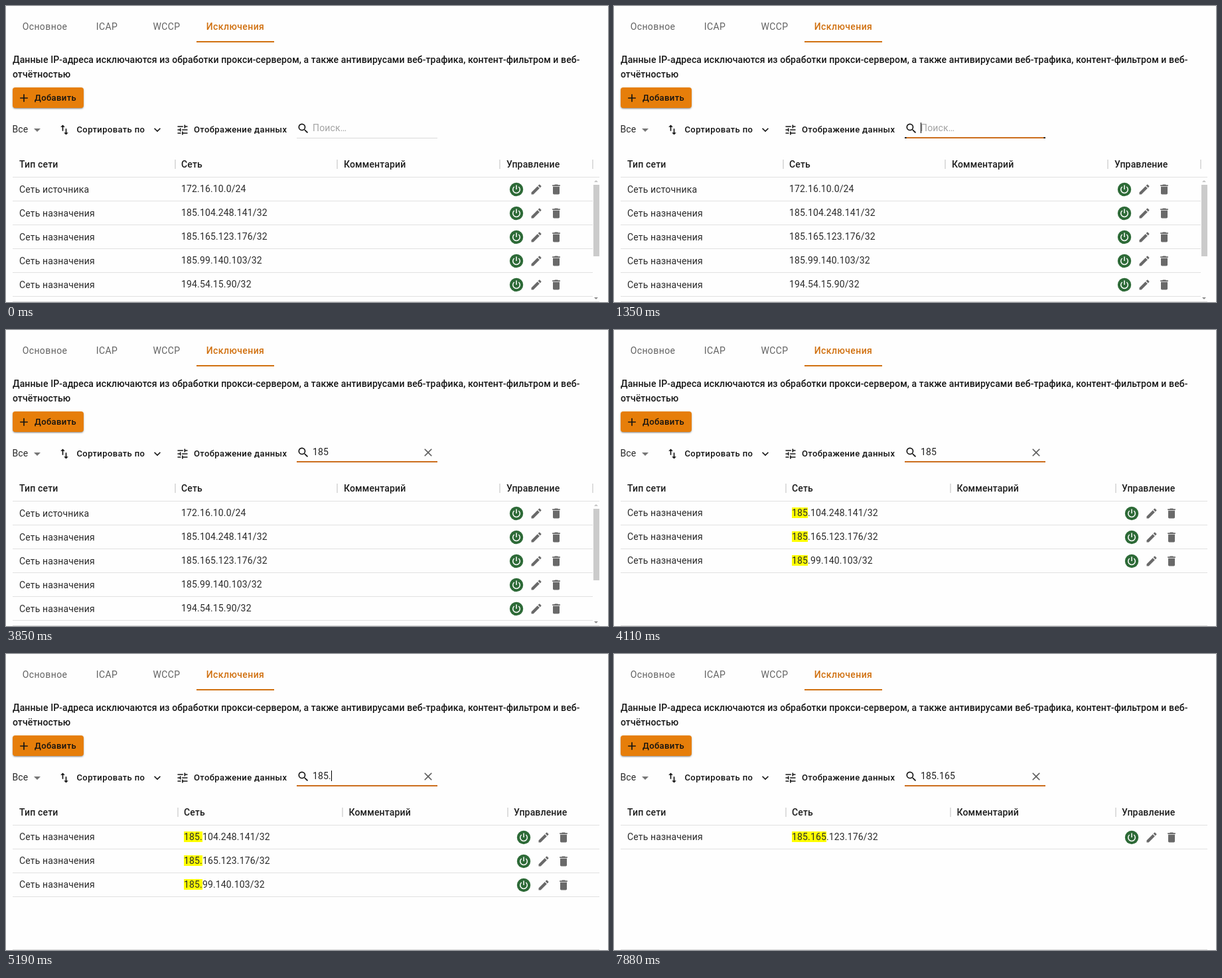
An HTML page for the animation above (8 s loop, 907 by 447 pixels).

```html
<!DOCTYPE html>
<html lang="ru">
<head>
<meta charset="utf-8">
<title>Исключения</title>
<style>
  html, body { margin: 0; width: 100%; height: 100%; overflow: hidden; background: #fefefe; }
  #stage {
    position: relative; width: 907px; height: 447px; overflow: hidden;
    font: 400 14px/20px Roboto, "Open Sans", sans-serif; letter-spacing: .15px; color: #2b2b2b;
  }
  #stage div, #stage svg { position: absolute; white-space: pre; }
  .tab { top: 21px; transform: translateX(-50%); letter-spacing: .4px; color: #636363; }
  .tab.on { color: #d0700f; font-weight: 500; }
  .intro { left: 10px; top: 70px; font-weight: 500; line-height: 22px; letter-spacing: .1px; color: #161616; }
  .btn { font-size: 13px; font-weight: 500; letter-spacing: .37px; color: #111; }
  .add {
    left: 10px; top: 123px; width: 107px; height: 31px; border-radius: 4px; background: #e67e0a;
    box-shadow: 0 2px 2px -1px #0004, 0 1px 3px #0004;
  }
  .head { top: 229px; font-weight: 500; color: #1c1c1c; }
  .sep { top: 232px; width: 2px; height: 14px; background: #dedede; }
  .rule { left: 10px; height: 1px; background: #e1e1e1; }
  .line { left: 438px; width: 212px; }
  mark { background: #ff0; color: inherit; }
  #input { left: 462px; top: 174px; color: #222; }
  #caret { display: inline-block; width: 1px; height: 16px; margin-right: -1px; background: #000; vertical-align: -3px; }
  #hint { left: 462px; top: 174px; color: #a3a3a3; }
</style>
</head>
<body>
<div id="stage">
  <div class="tab" style="left:58.5px">Основное</div>
  <div class="tab" style="left:152px">ICAP</div>
  <div class="tab" style="left:242px">WCCP</div>
  <div class="tab on" style="left:345.5px">Исключения</div>
  <div style="left:287px;top:53px;width:117px;height:2px;background:#d0700f"></div>

  <div class="intro">Данные IP-адреса исключаются из обработки прокси-сервером, а также антивирусами веб-трафика, контент-фильтром и веб-
отчётностью</div>

  <div class="add"></div>
  <div class="btn" style="left:43px;top:129px">Добавить</div>

  <div style="left:9.5px;top:176px">Все</div>
  <div class="btn" style="left:106.5px;top:177px">Сортировать по</div>
  <div class="btn" style="left:283px;top:177px">Отображение данных</div>

  <div id="hint">Поиск…</div>
  <div id="input"><span id="typed"></span><span id="caret"></span></div>
  <div class="line" style="top:199px;height:1px;background:#dadada"></div>
  <div class="line" id="hover" style="top:198px;height:2px;background:#222"></div>
  <div class="line" id="focus" style="top:198px;height:2px;background:#cb6d1c"></div>

  <div id="toolbar"></div>
  <div id="table"></div>
  <div class="rule" style="top:446px;width:884px;background:#d9d9d9"></div>
</div>

<script>
const LOOP = 8000;
const $ = id => document.getElementById(id);

const ICONS = {
  add: "M19 13h-6v6h-2v-6H5v-2h6V5h2v6h6z",
  drop: "M7 10l5 5 5-5z",
  swap: "M16 17.01V10h-2v7.01h-3L15 21l4-3.99zM9 3 5 6.99h3V14h2V6.99h3z",
  more: "M16.59 8.59 12 13.17 7.41 8.59 6 10l6 6 6-6z",
  tune: "M3 17v2h6v-2zM3 5v2h10V5zm10 16v-2h8v-2h-8v-2h-2v6zM7 9v2H3v2h4v2h2V9zm14 4v-2H11v2zm-6-4h2V7h4V5h-4V3h-2z",
  search: "M15.5 14h-.79l-.28-.27A6.5 6.5 0 1 0 13.73 14.43l.27.28v.79l5 4.99L20.49 19zm-6 0a4.5 4.5 0 1 1 0-9 4.5 4.5 0 0 1 0 9z",
  close: "M19 6.41 17.59 5 12 10.59 6.41 5 5 6.41 10.59 12 5 17.59 6.41 19 12 13.41 17.59 19 19 17.59 13.41 12z",
  edit: "M3 17.25V21h3.75L17.81 9.94l-3.75-3.75zM20.71 7.04a1 1 0 0 0 0-1.41l-2.34-2.34a1 1 0 0 0-1.41 0l-1.83 1.83 3.75 3.75z",
  trash: "M6 19c0 1.1.9 2 2 2h8c1.1 0 2-.9 2-2V7H6zM19 4h-3.5l-1-1h-5l-1 1H5v2h14z"
};

// Icons are placed by their centre.
const svg = (x, y, size, body, id = "") =>
  `<svg id="${id}" width="${size}" height="${size}" viewBox="0 0 24 24" style="left:${x - size / 2}px;top:${y - size / 2}px">${body}</svg>`;
const icon = (name, x, y, color = "#151515", size = 20) =>
  svg(x, y, size, `<path fill="${color}" d="${ICONS[name]}"/>`, "i-" + name);
const power = (x, y) => svg(x, y, 24,
  `<circle cx="12" cy="12" r="10.2" fill="#2d6a37"/>
   <path d="M8.7 8A5.3 5.3 0 1 0 15.3 8M12 5.6V12" fill="none" stroke="#fff" stroke-width="1.5"/>`);
const box = (x, y, css, text = "", cls = "") =>
  `<div class="${cls}" style="left:${x}px;top:${y}px;${css}">${text}</div>`;
const rule = (y, right) => `<div class="rule" style="top:${y}px;width:${right - 10}px"></div>`;

$("toolbar").innerHTML =
  icon("add", 27, 139) + icon("drop", 46.5, 187, "#757575", 24) + icon("swap", 88, 187) +
  icon("more", 227.5, 187) + icon("tune", 265.5, 187) + icon("search", 448, 185) +
  icon("close", 635.5, 185, "#5f5f5f");

const NETS = ["172.16.10.0/24", "185.104.248.141/32", "185.165.123.176/32", "185.99.140.103/32", "194.54.15.90/32"];

function tableHtml(query) {
  const full = !query;
  const cols = full ? [20, 264, 509, 754] : [20, 268, 516.5, 765];
  const seps = full ? [253.5, 498, 743, 882.5] : [257.5, 505.5, 754.5];
  const right = full ? 884 : 894;
  const titles = ["Тип сети", "Сеть", "Комментарий", "Управление"];
  let html = titles.map((s, i) => `<div class="head" style="left:${cols[i]}px">${s}</div>`).join("")
    + seps.map(x => `<div class="sep" style="left:${x}px"></div>`).join("")
    + rule(258, 894);
  NETS.filter(n => n.startsWith(query)).forEach((net, i) => {
    const y = 266 + 36 * i, x = cols[3] + 15, mid = y + 10.5;
    const kind = full && i === 0 ? "Сеть источника" : "Сеть назначения";
    const addr = full ? net : `<mark>${query}</mark>${net.slice(query.length)}`;
    html += box(cols[0], full ? y + 1 : y, "", kind) + box(cols[1], y, "", addr)
      + power(x, mid) + icon("edit", x + 30, mid, "#696969") + icon("trash", x + 60, mid, "#696969")
      + rule(y + 28, right);
  });
  if (full) {
    const arrow = "width:0;height:0;border:3px solid transparent;";
    html += box(885, 270, "width:9px;height:108px;background:#cbcbcb")
      + box(886, 260, arrow + "border-bottom-color:#c4c4c4")
      + box(886, 440, arrow + "border-top-color:#8a8a8a");
  }
  return html;
}

const TYPED = [[0, ""], [2480, "1"], [2800, "18"], [3130, "185"], [4310, "185."], [5650, "185.1"], [6790, "185.16"], [6930, "185.165"]];
const QUERY = [[0, ""], [4110, "185"], [5150, "185."], [7750, "185.165"]];
const CARET = [[0, false], [1220, true], [1820, false], [2410, true], [3850, false], [4310, true], [6250, false], [6790, true], [7480, false]];

const at = (track, t) => track.filter(k => k[0] <= t).pop()[1];
const ramp = (t, from, length) => Math.min(1, Math.max(0, (t - from) / length));

let shown = null;
function render(t) {
  const typed = at(TYPED, t), query = at(QUERY, t);
  $("typed").textContent = typed;
  $("hint").style.visibility = typed ? "hidden" : "visible";
  $("i-close").style.visibility = typed ? "visible" : "hidden";
  $("caret").style.visibility = at(CARET, t) ? "visible" : "hidden";
  $("hover").style.opacity = ramp(t, 880, 140);
  $("focus").style.transform = `scaleX(${1 - (1 - ramp(t, 1210, 200)) ** 3})`;
  if (query !== shown) {
    $("table").innerHTML = tableHtml(query);
    shown = query;
  }
}

const start = performance.now();
function tick() {
  render((performance.now() - start) % LOOP);
  requestAnimationFrame(tick);
}
tick();
</script>
</body>
</html>
```
